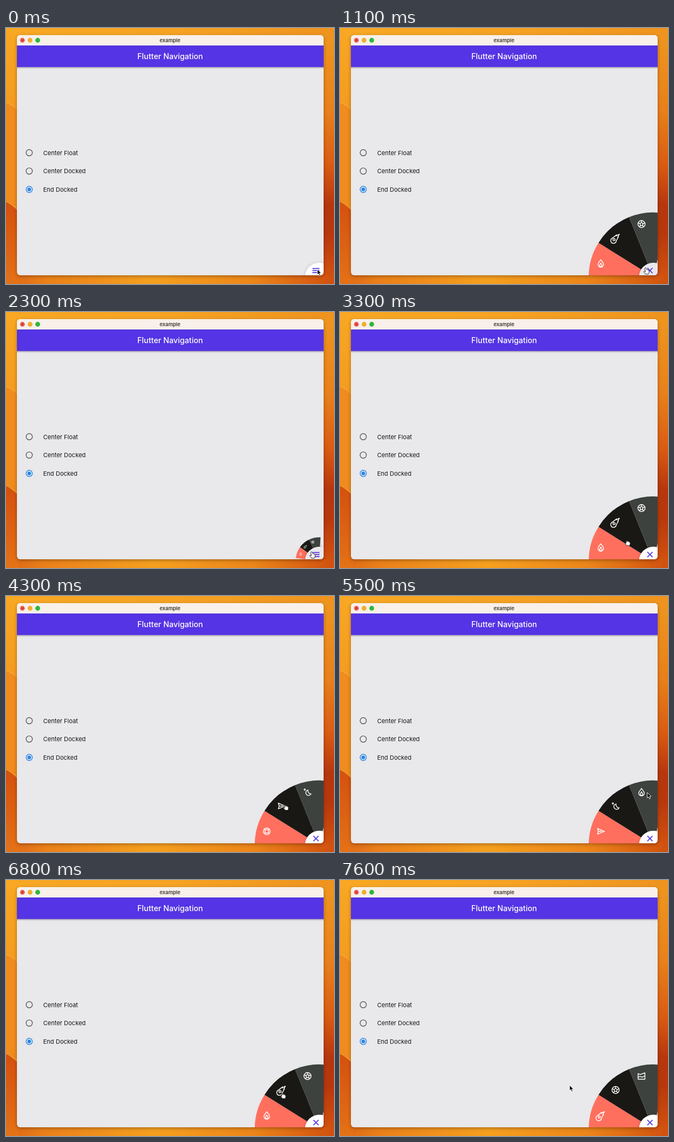
Animation of 600 by 469 pixels, one loop 7700 ms. Source, as an HTML page:

```html
<!DOCTYPE html>
<html lang="en">
<head>
<meta charset="utf-8">
<title>Flutter Navigation</title>
<style>
  html, body { margin: 0; width: 100%; height: 100%; overflow: hidden; }
  svg { display: block; width: 600px; height: 469px; }
  text { font-family: Inter, Roboto, sans-serif; }
  .icon { fill: none; stroke: #fff; stroke-width: 1.4; stroke-linejoin: round; stroke-linecap: round; }
  .mark { fill: none; stroke: #5434e4; stroke-width: 1.7; }
  .cursor path { stroke-width: .9; stroke-linejoin: round; }
</style>
</head>
<body>
<svg viewBox="0 0 600 469">
  <defs>
    <linearGradient id="top"><stop stop-color="#f8a824"/><stop offset=".5" stop-color="#f6a323"/><stop offset="1" stop-color="#ee931f"/></linearGradient>
    <linearGradient id="left" x2="0" y2="1"><stop stop-color="#f8a623"/><stop offset=".4" stop-color="#f3981f"/><stop offset="1" stop-color="#f29b20"/></linearGradient>
    <linearGradient id="right" x2="0" y2="1"><stop stop-color="#ee951f"/><stop offset=".3" stop-color="#e8801b"/><stop offset=".52" stop-color="#d95c12"/><stop offset=".68" stop-color="#b7370d"/><stop offset=".8" stop-color="#b8380d"/><stop offset="1" stop-color="#d6560f"/></linearGradient>
    <linearGradient id="bottom"><stop stop-color="#dc6515"/><stop offset=".12" stop-color="#ea801a"/><stop offset=".45" stop-color="#f5a01f"/><stop offset=".75" stop-color="#ec861a"/><stop offset="1" stop-color="#d0500f"/></linearGradient>
    <linearGradient id="fold" x2="0" y2="1"><stop stop-color="#d4500e"/><stop offset="1" stop-color="#e47217"/></linearGradient>
    <linearGradient id="shade" x2="0" y2="1"><stop stop-opacity=".3"/><stop offset="1" stop-opacity="0"/></linearGradient>
    <filter id="soft" x="-10%" y="-10%" width="120%" height="120%"><feGaussianBlur stdDeviation="3"/></filter>
    <clipPath id="frame"><rect x="20" y="13" width="561" height="440" rx="6"/></clipPath>
  </defs>

  <rect width="600" height="469" fill="url(#top)"/>
  <rect y="13" width="300" height="456" fill="url(#left)"/>
  <path d="M0 136Q12 141 24 152V330L0 318Z" fill="#ef8c1d"/>
  <path d="M0 136Q12 141 24 152" fill="none" stroke="#f9b54a"/>
  <rect x="300" y="13" width="300" height="456" fill="url(#right)"/>
  <rect y="453" width="600" height="16" fill="url(#bottom)"/>
  <path d="M0 318Q14 325 24 337V469H0Z" fill="url(#fold)"/>
  <path d="M0 318Q14 325 24 337" fill="none" stroke="#f0a040"/>
  <rect x="20" y="15" width="561" height="440" rx="6" opacity=".3" filter="url(#soft)"/>

  <g clip-path="url(#frame)">
    <rect x="20" y="13" width="561" height="440" fill="#e9e8ea"/>
    <rect x="20" y="71" width="561" height="4" fill="url(#shade)"/>
    <rect x="20" y="13" width="561" height="19" fill="#f8f0e9"/>
    <rect x="20" y="32" width="561" height="39.5" fill="#5434e4"/>
    <circle cx="30" cy="22.5" r="4.4" fill="#ee5e55"/>
    <path d="M28.4 20.9l3.2 3.2m0-3.2l-3.2 3.2" stroke="#8a1f18"/>
    <circle cx="44" cy="22.5" r="4.4" fill="#efae2e"/>
    <circle cx="58" cy="22.5" r="4.4" fill="#2cb83f"/>
    <text x="300" y="25.5" font-size="9.3" font-weight="600" fill="#3b3836" text-anchor="middle">example</text>
    <text x="300.3" y="57" font-size="14.2" font-weight="500" fill="#fff" text-anchor="middle">Flutter Navigation</text>
    <g id="options"></g>
    <g id="wheel"><path fill="#ff6f5e"/><path fill="#191815"/><path fill="#3e423f"/></g>
    <g id="icons"></g>
    <circle cx="573" cy="457" r="26.5" opacity=".16" filter="url(#soft)"/>
    <circle id="fab" cx="573" cy="456" r="26"/>
    <path id="menu" class="mark" d="M560.5 440.6h13m-13 3.8h13m-13 3.8h13"/>
    <path id="close" class="mark" d="M562.3 439.7l9.4 9.4m0-9.4l-9.4 9.4"/>
  </g>

  <g class="cursor" id="arrow"><path d="M0 0V10L2.3 7.9 4 11.7 5.8 10.9 4.1 7.2H7.2Z" fill="#000" stroke="#fff"/></g>
  <g class="cursor" id="point"><path d="M-1.8-5.2Q-.6-6.3.2-4.8L1.4-2Q3-3 3.4-1.5 5-2 5.2-.3L5.5 3 4 6H-.8L-4.4 1.8Q-4.5.2-2.5.8L-1.3 1.4-2.5-3.8Z" fill="#fff" stroke="#111"/></g>
  <g class="cursor" id="grab"><path d="M-3-4Q-1.8-5-1.2-3.6L-.7-2.4-.8-4.3Q.4-5.3 1-3.8L1.4-2.3Q2.6-4.2 3.3-2.6L3.5-1.4Q5.2-2 5 0L4 4.5H-1L-4.6.7Q-4.5-.8-2.6.2Z" fill="#fff" stroke="#111"/></g>
</svg>

<script>
const LOOP = 7700, STEP = 100, CX = 573, CY = 456, RADIUS = 118;
const $ = id => document.getElementById(id);

$('options').innerHTML = ['Center Float', 'Center Docked', 'End Docked'].map((label, i) => {
  const y = 228.5 + i * 33.6, on = i === 2, color = on ? '#2485e8' : '#5c5b5d';
  return `<circle cx="42.5" cy="${y}" r="5.7" fill="none" stroke="${color}" stroke-width="1.4"/>` +
    (on ? `<circle cx="42.5" cy="${y}" r="3.3" fill="${color}"/>` : '') +
    `<text x="68" y="${y + 4}" font-size="11" fill="#161616">${label}</text>`;
}).join('');

// flame, comet, ball, chart, lifebuoy, plane, moon
const icons = [
  'M0-6.8C1 -4 5.1-1.8 5.1 2A5.1 5 0 0 1-5.1 2C-5.1-1.8-1-4 0-6.8ZM0-.8C.2 1 2.2 1.6 2.2 3.8A2.2 2.2 0 0 1-2.2 3.8C-2.2 1.8-.2 1 0-.8Z',
  'M-5.8.2L2-5.8 1.2-3.8 6.8-7 3.8-1.4 5.2-2 1.2 5.2A5 5 0 1 1-5.8.2ZM-4.8 3a2 2 0 1 0 4 0a2 2 0 1 0-4 0',
  'M-6.5 0a6.5 6.5 0 1 0 13 0a6.5 6.5 0 1 0-13 0M0-3L2.9-.9 1.8 2.5H-1.8L-2.9-.9ZM0-3V-6M2.9-.9L6-2M1.8 2.5L3.7 5M-1.8 2.5L-3.7 5M-2.9-.9L-6-2',
  'M-6.2-4.5L-3-2.8 1-4 6.2-6V5.8H-6.2ZM-6.2 2L-2.5.7 1.5 2 6.2-.8',
  'M-6.2 0a6.2 6.2 0 1 0 12.4 0a6.2 6.2 0 1 0-12.4 0M-3.4 0a3.4 3.4 0 1 0 6.8 0a3.4 3.4 0 1 0-6.8 0M-4.3-4.3l1.9 1.9M4.3-4.3l-1.9 1.9M-4.3 4.3l1.9-1.9M4.3 4.3l-1.9-1.9',
  'M-6-5.2L6.6 0-6 5.2-4.4 0ZM-4.4 0H1.5',
  'M1-3.8A5 5 0 1 0 6.4 3.2A5.4 5.4 0 0 1 1-3.8ZM-5-6.2V-3M-6.6-4.6H-3.4'
];
$('icons').innerHTML = icons.map(d => `<path class="icon" d="${d}"/>`).join('');

// Each key is [time, ...values]
const openKeys = [[500, 0], [900, 1], [2064, 1], [2464, 0], [2800, 0], [3150, 1]];
const turnKeys = [[3350, 0], [4200, 4], [4700, 4], [5300, 5], [5800, 5], [6600, 7], [6950, 7], [7350, 8]];
const pointerKeys = [
  [0, 569.5, 442], [300, 560, 445], [3150, 560, 445], [3450, 492, 402], [4300, 512, 388],
  [4700, 508, 376], [5200, 520, 400], [5500, 562, 360], [5800, 540, 366], [6500, 500, 405],
  [6800, 507, 396], [7250, 470, 418], [7600, 420, 376]
];
const cursorKeys = [[0, 'arrow'], [300, 'point'], [3300, 'grab'], [5300, 'arrow'], [5700, 'grab'], [7250, 'arrow']];

function track(keys, t) {
  const i = keys.findIndex(k => k[0] > t);
  if (i < 0) return keys.at(-1).slice(1);
  if (i === 0) return keys[0].slice(1);
  const a = keys[i - 1], b = keys[i], u = (t - a[0]) / (b[0] - a[0]), e = u * u * (3 - 2 * u);
  return a.slice(1).map((v, j) => v + (b[j + 1] - v) * e);
}

// Angles run clockwise from the left horizontal
function polar(deg, r) {
  const a = deg * Math.PI / 180;
  return [CX - r * Math.cos(a), CY - r * Math.sin(a)];
}

function draw(t) {
  const [open] = track(openKeys, t), [turn] = track(turnKeys, t), [x, y] = track(pointerKeys, t);
  const r = RADIUS * open, sweep = 21 + 15 * Math.min(1, open + .15);

  [...$('wheel').children].forEach((path, i) => {
    const from = 50 + (i - 1.5) * sweep;
    path.setAttribute('d', `M${CX} ${CY}L${polar(from, r)}A${r} ${r} 0 0 1 ${polar(from + sweep, r)}Z`);
  });

  const n = icons.length;
  [...$('icons').children].forEach((icon, i) => {
    const slot = ((i - turn + 1) % n + n) % n - 1;
    icon.style.display = open > .02 && slot < 3 ? '' : 'none';
    icon.setAttribute('transform', `translate(${polar(46 + (slot - 1) * sweep * .875, r * .84)}) scale(${open})`);
  });

  const expanded = t >= 500 && t < 2064 || t >= 2800;
  $('menu').style.display = expanded ? 'none' : '';
  $('close').style.display = expanded ? '' : 'none';
  $('fab').setAttribute('fill', t >= 300 && t < 3300 ? '#e9e8ec' : '#fff');

  const kind = cursorKeys.filter(k => k[0] <= t).at(-1)[1];
  for (const id of ['arrow', 'point', 'grab']) {
    $(id).style.display = id === kind ? '' : 'none';
    $(id).setAttribute('transform', `translate(${x} ${y})`);
  }
}

const start = performance.now();
function tick() {
  const t = (performance.now() - start) % LOOP;
  draw(Math.floor(t / STEP) * STEP);
  requestAnimationFrame(tick);
}
tick();
</script>
</body>
</html>
```
